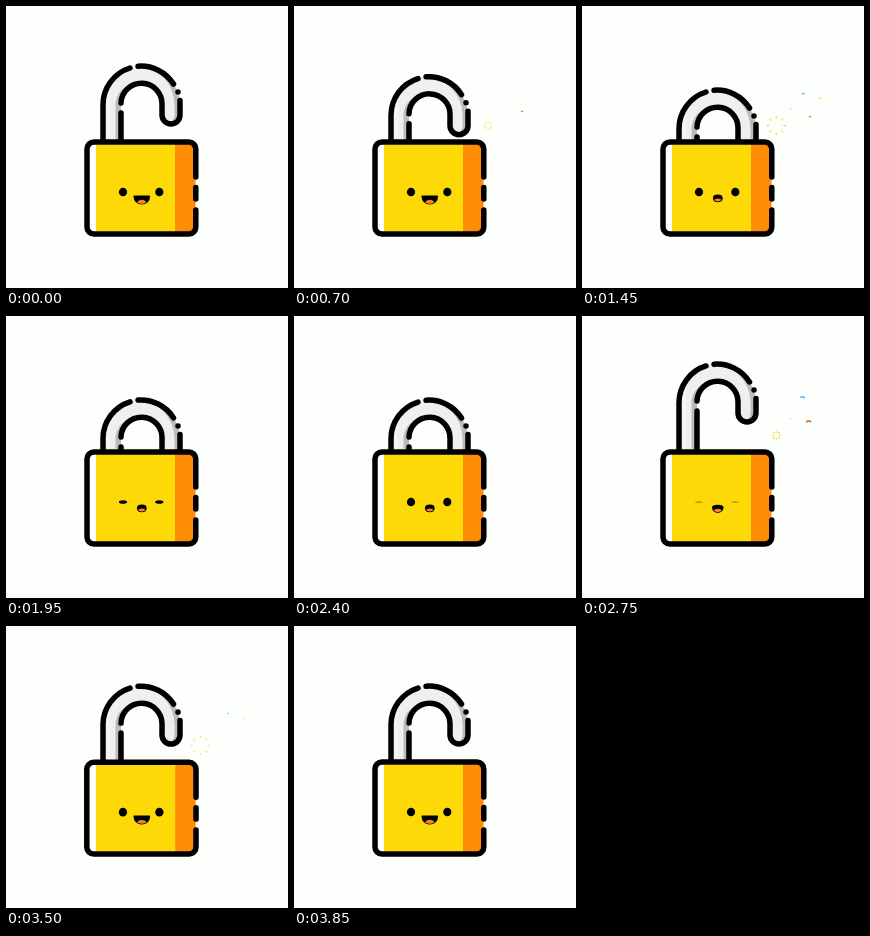
An HTML page for the animation above (3900 ms loop, 282 by 282 pixels).

```html
<!DOCTYPE html>
<html lang="en">
<head>
<meta charset="utf-8">
<title>Padlock</title>
<style>
  html, body { margin: 0; width: 100%; height: 100%; overflow: hidden; background: #fdfffc; }
  svg { display: block; width: 100%; height: 100%; }
  .line { fill: none; stroke: #000; stroke-width: 5.5; stroke-linecap: round; stroke-linejoin: round; }
  #burst { fill: none; stroke-linecap: round; }
</style>
</head>
<body>
<svg viewBox="0 0 282 282">
  <defs>
    <path id="tube" d="M97 165V98.5A38.5 38.5 0 0 1 174 98.5V109A9 9 0 0 1 156 109V98.5A20.5 20.5 0 0 0 115 98.5V165Z"/>
    <clipPath id="tubeClip"><use href="#tube"/></clipPath>
    <clipPath id="mouthClip"><path id="mouthShape"/></clipPath>
    <clipPath id="aboveBody"><rect width="282" height="150"/></clipPath>
  </defs>
  <g clip-path="url(#aboveBody)">
    <g id="shackle">
      <g clip-path="url(#tubeClip)">
        <use href="#tube" fill="#bfbaba"/>
        <use href="#tube" x="-5.5" fill="#f1eeee"/>
        <rect x="94" y="56" width="10" height="110" fill="#f5f3f3"/>
      </g>
      <path class="line" d="M97 165V98.5A38.5 38.5 0 0 1 124 62
        M132 60.2A38.5 38.5 0 0 1 167.5 78 M172 86V86.1
        M174 94.5V109A9 9 0 0 1 156 109V98.5A20.5 20.5 0 0 0 115 97 M115 107V165"/>
    </g>
  </g>
  <g id="body">
    <rect x="81" y="136" width="108.5" height="92" rx="7" fill="#fff"/>
    <path d="M90 136H169V228H90Z" fill="#fdd908"/>
    <path d="M169 136H182.5A7 7 0 0 1 189.5 143V221A7 7 0 0 1 182.5 228H169Z" fill="#ff8c05"/>
    <path class="line" d="M189.8 171V143A7 7 0 0 0 182.8 136H88A7 7 0 0 0 81 143V221A7 7 0 0 0 88 228H182.8A7 7 0 0 0 189.8 221V204
      M189.8 181.5V193"/>
    <ellipse class="eye" cx="117" cy="186" rx="4.1"/>
    <ellipse class="eye" cx="153.3" cy="186" rx="4.1"/>
    <path id="mouth" stroke="#000" stroke-width="1.5" stroke-linejoin="round"/>
    <ellipse id="tongue" cx="135.8" fill="#f5822a" clip-path="url(#mouthClip)"/>
  </g>
  <g id="burst"></g>
</svg>
<script>
const LOOP = 3900, STEP = 50, TAU = 2 * Math.PI;
const $ = id => document.getElementById(id);
const set = (el, attrs) => { for (const k in attrs) el.setAttribute(k, attrs[k]); };
const clamp = v => Math.max(0, Math.min(1, v));
const mix = (a, b, k) => a + (b - a) * k;
const ramp = (t, from, to) => clamp((t - from) / (to - from));
const smooth = v => v * v * (3 - 2 * v);
const easeOut = v => 1 - (1 - v) ** 3;
const swing = (age, period, decay) => Math.cos(TAU * age / period) * Math.exp(-age / decay);

// Shackle offset: drops and bounces at 850, springs open and settles after 2830
function lift(t) {
  if (t < 850) return 30.5 * ramp(t, 400, 850) ** 2.6;
  if (t < 2420) return 24 + 6.5 * swing(t - 850, 480, 400);
  if (t < 2830) return mix(24, -16, smooth(ramp(t, 2420, 2830)));
  return -16 * swing(t - 2830, 440, 130);
}

// Squash that builds up to a hit, then rings out
const squash = (t, hit) => t < hit ? smooth(ramp(t, hit - 150, hit)) : swing(t - hit, 480, 250);
const smile = t => 1 - smooth(ramp(t, 700, 850)) + smooth(ramp(t, 2650, 2950));
const blink = (t, mid, half) => clamp(Math.abs(t - mid) / half);

const YELLOW = '#f2d535', ORANGE = '#d97b2f', BLUE = '#55bde6';
const confetti = [
  ['arc', 226.7, 108, 3, ORANGE],
  ['arc', 220, 84.5, 3.7, BLUE],
  ['cross', 208.5, 102.7, 2.2, ORANGE],
  ['dot', 207, 130, 1.4, ORANGE],
  ['cross', 238.5, 92, 3.1, YELLOW],
  ['dot', 204, 84, 1.3, YELLOW],
  ['dot', 216, 118, .9, YELLOW]
].map(([kind, x, y, r, color], i) => ({ kind, x, y, r, delay: 8 + 12 * i, el: addPath(color) }));
const rays = addPath('#f3d93c');

function addPath(stroke) {
  const p = document.createElementNS('http://www.w3.org/2000/svg', 'path');
  set(p, { stroke });
  return $('burst').appendChild(p);
}

function drawRays(age) {
  const outer = 3.8 + 5.2 * easeOut(ramp(age, 40, 420));
  const inner = Math.min(outer - .4, mix(3.2, 9, ramp(age, 300, 830) ** 2));
  let d = '';
  for (let i = 0; i < 8; i++) {
    const c = Math.cos(i * TAU / 8), s = Math.sin(i * TAU / 8);
    d += `M${194.3 + c * inner} ${119.5 + s * inner}L${194.3 + c * outer} ${119.5 + s * outer}`;
  }
  set(rays, { d, 'stroke-width': mix(1.1, 1.8, ramp(age, 20, 250) - ramp(age, 600, 850)) });
}

function drawPiece({ kind, x, y, r, delay, el }, age) {
  const grow = easeOut(ramp(age - delay, 0, 340));
  const fade = ramp(age - delay, 520, 790);
  const k = grow * (1 - fade);
  el.style.display = k > .01 ? '' : 'none';
  if (kind === 'arc') {
    const point = v => {
      const a = -(50 + 260 * v) * Math.PI / 180;
      return `${x + r * Math.cos(a)} ${y + r * Math.sin(a)}`;
    };
    const large = grow - fade > 180 / 260 ? 1 : 0;
    set(el, {
      d: `M${point(fade)}A${r} ${r} 0 ${large} 0 ${point(grow)}`,
      'stroke-width': 2.3 * Math.min(1, .4 + k)
    });
  } else if (kind === 'cross') {
    const s = r * k;
    set(el, {
      d: `M${x - s} ${y - s}L${x + s} ${y + s}M${x + s} ${y - s}L${x - s} ${y + s}`,
      'stroke-width': .9 * s
    });
  } else {
    set(el, { d: `M${x} ${y}h.01`, 'stroke-width': 2 * r * k });
  }
}

function drawBurst(t) {
  const age = t - (t < 2000 ? 680 : 2700);
  const on = age > 0 && age < 880;
  $('burst').style.display = on ? '' : 'none';
  if (!on) return;
  drawRays(age);
  for (const piece of confetti) drawPiece(piece, age);
}

function drawFace(t) {
  const open = Math.max(.06, blink(t, 2000, 120) * blink(t, 2755, 150));
  for (const eye of document.querySelectorAll('.eye')) set(eye, { ry: 4.3 * open });
  const m = smile(t);
  const x = 135.8, w = mix(4.1, 7.6, m), y = mix(192, 190.2, m);
  const up = mix(3.6, 0, m), down = mix(4.8, 10, m);
  const d = `M${x - w} ${y}C${x - w} ${y - up} ${x + w} ${y - up} ${x + w} ${y}`
    + `C${x + w} ${y + down} ${x - w} ${y + down} ${x - w} ${y}Z`;
  set($('mouth'), { d });
  set($('mouthShape'), { d });
  set($('tongue'), { cy: mix(195.2, 197.5, m), rx: mix(4, 5, m), ry: mix(2.8, 3.7, m) });
}

function draw(t) {
  const q = .062 * (squash(t, 850) + .45 * squash(t, 3000) * (t > 2800));
  set($('shackle'), { transform: `translate(0 ${lift(t)})` });
  set($('body'), { transform: `translate(135.3 228) scale(${1 + q} ${1 - q}) translate(-135.3 -228)` });
  drawFace(t);
  drawBurst(t);
}

const start = performance.now();
function tick() {
  const t = (performance.now() - start) % LOOP;
  draw(Math.floor(t / STEP) * STEP);
  requestAnimationFrame(tick);
}
tick();
</script>
</body>
</html>
```
